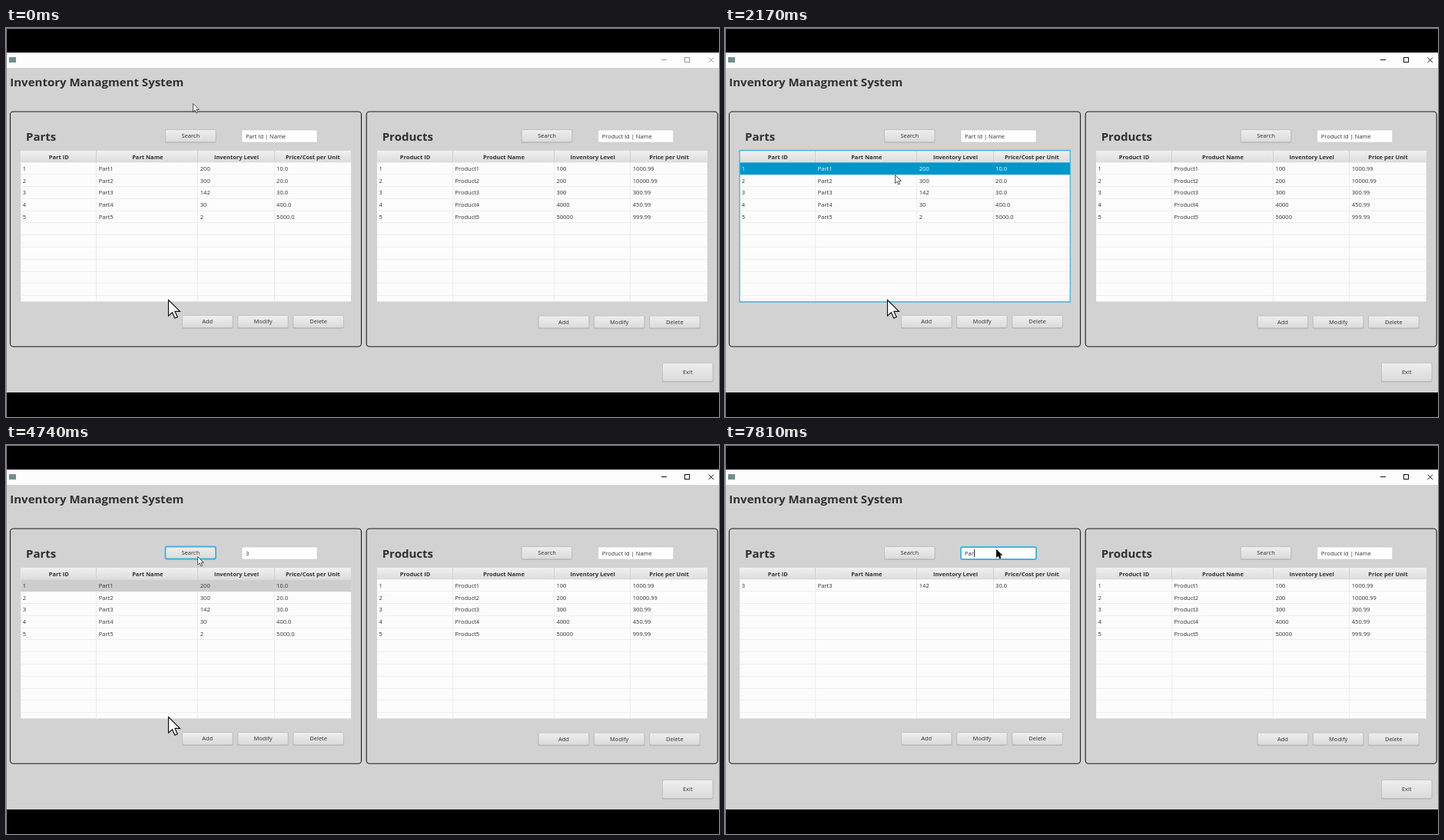
Recreate the animation shown at these times as an HTML page with a canvas. Size 928 by 507 pixels, loop 8 s.

```html
<!DOCTYPE html>
<html lang="en">
<head>
<meta charset="utf-8">
<title>Inventory</title>
<style>
  html, body { margin: 0; width: 100%; height: 100%; overflow: hidden; background: #000; }
  canvas { display: block; width: 928px; height: 507px; }
</style>
</head>
<body>
<canvas id="stage" width="928" height="507"></canvas>
<script>
const ctx = document.getElementById('stage').getContext('2d');
const FONT = '"Open Sans", "Noto Sans", sans-serif';
const INK = '#303030', BLUE = '#0096c9', RING = '#48b2d8';
const LOOP = 8000, STEP = 182, LAST = 43;
const ROW = 15.8, ROW_TOP = 175.3;

const parts = {
  title: 'Parts', prompt: 'Part Id | Name', dx: 0, dy: 0,
  heads: ['Part ID', 'Part Name', 'Inventory Level', 'Price/Cost per Unit'],
  rows: [['1', 'Part1', '200', '10.0'], ['2', 'Part2', '300', '20.0'], ['3', 'Part3', '142', '30.0'],
         ['4', 'Part4', '30', '400.0'], ['5', 'Part5', '2', '5000.0']]
};
const products = {
  title: 'Products', prompt: 'Product Id | Name', dx: 463.7, dy: 0.5,
  heads: ['Product ID', 'Product Name', 'Inventory Level', 'Price per Unit'],
  rows: [['1', 'Product1', '100', '1000.99'], ['2', 'Product2', '200', '10000.99'], ['3', 'Product3', '300', '300.99'],
         ['4', 'Product4', '4000', '450.99'], ['5', 'Product5', '50000', '999.99']]
};

// Pointer paths as [step, x, y]
const pointerPath = [
  [0, 243, 98], [3, 115, 182], [5, 80, 188], [6, 80, 191], [8, 40, 192], [9, 24, 212], [10, 66, 230],
  [12, 221, 191], [13, 224, 190], [18, 346, 140], [20, 362, 146], [22, 350, 141], [24, 262, 144],
  [26, 249, 145], [28, 249, 145], [31, 282, 145], [34, 353, 136]
];
const bigPath = [[0, 211, 354], [28, 211, 354], [31, 294, 350], [34, 361, 192]];

function along(path, k) {
  const i = path.findIndex(p => p[0] > k);
  if (i < 0) return path[path.length - 1].slice(1);
  const [a, x0, y0] = path[i - 1], [b, x1, y1] = path[i];
  const u = (k - a) / (b - a);
  return [Math.round(x0 + (x1 - x0) * u), Math.round(y0 + (y1 - y0) * u)];
}

function rect(x, y, w, h, fill) {
  ctx.fillStyle = fill;
  ctx.fillRect(x, y, w, h);
}

function box(x, y, w, h, r, fill, stroke, line = 1) {
  ctx.beginPath();
  ctx.roundRect(x, y, w, h, r);
  if (fill) { ctx.fillStyle = fill; ctx.fill(); }
  if (stroke) { ctx.strokeStyle = stroke; ctx.lineWidth = line; ctx.stroke(); }
}

function text(str, x, y, { size = 7.5, bold = false, align = 'left', color = INK } = {}) {
  ctx.font = `${bold ? 700 : 400} ${size}px ${FONT}`;
  ctx.textAlign = align;
  ctx.fillStyle = color;
  ctx.fillText(str, x, y + size * 0.36);
}

function shade(y, h, top, bottom) {
  const g = ctx.createLinearGradient(0, y, 0, y + h);
  g.addColorStop(0, top);
  g.addColorStop(1, bottom);
  return g;
}

function button(label, x, y, w, h, focused) {
  box(x, y + 0.8, w, h, 2, '#b4b4b4');
  box(x + 0.5, y + 0.5, w - 1, h - 1, 2, shade(y, h, '#efefef', '#dadada'), '#c2c2c2');
  if (focused) box(x + 0.5, y + 0.5, w - 1, h - 1, 2, null, RING, 1.8);
  text(label, x + w / 2, y + h / 2, { align: 'center' });
}

function field(x, y, value, focused) {
  box(x, y, 98, 16, 1.5, '#fff', '#c8c8c8', 0.6);
  if (focused) box(x, y, 98, 16, 2, null, RING, 1.8);
  text(value, x + 5, y + 8);
  if (focused) rect(Math.round(x + 5 + ctx.measureText(value).width), y + 3, 1, 10, '#333');
}

function table(data, rows, selected, focused) {
  const x = 19.3 + data.dx, edges = [0, 99, 231, 330.3, 429.7];
  rect(x, 160, 429.7, 196.5, '#fcfcfc');
  rect(x, 160, 429.7, 15.3, shade(160, 15.3, '#f0f0f0', '#dcdcdc'));
  for (let i = 1; i < 12; i++) rect(x, Math.round(ROW_TOP + i * ROW) - 1, 429.7, 1, '#eeeeee');
  if (selected) rect(x, 175.3, 429.7, 15.9, focused ? BLUE : '#cdcdcd');
  for (let i = 1; i < 4; i++) {
    const cx = Math.round(x + edges[i]) - 1;
    rect(cx, 160, 1, 15, '#cfcfcf');
    rect(cx, selected ? 191 : 175, 1, selected ? 165 : 181, '#ededed');
  }
  data.heads.forEach((head, i) =>
    text(head, x + (edges[i] + edges[i + 1]) / 2, 167.8, { bold: true, align: 'center' }));
  rows.forEach((row, r) => row.forEach((cell, c) =>
    text(cell, x + edges[c] + 2.5, 183 + r * ROW, { color: selected && focused && !r ? '#fff' : INK })));
  if (focused) box(x - 0.3, 159.5, 430.3, 197.5, 0, null, RING, 1.3);
}

function panel(data, s) {
  const { dx, dy } = data;
  box(5.5 + dx, 109, 457, 306.3, 4, null, '#1c1c1c', 1.1);
  text(data.title, 26 + dx, 141.3, { size: 15, bold: true });
  button('Search', 207 + dx, 132, 66.5, 17, s.searchFocus);
  field(307 + dx, 133, s.value ?? data.prompt, s.fieldFocus);
  table(data, s.rows || data.rows, s.selected, s.tableFocus);
  ['Add', 'Modify', 'Delete'].forEach((label, i) =>
    button(label, 229 + dx + i * 72.2, 374 + dy, 66.5, 17));
}

function pointer(x, y, size, fill, edge, line) {
  const pts = [[0, 0], [0, 17], [4, 13.3], [6.8, 19.5], [9.6, 18.2], [6.9, 12.2], [12.2, 12.2]];
  ctx.beginPath();
  pts.forEach(([px, py]) => ctx.lineTo(x + 0.5 + px * size, y + 0.5 + py * size));
  ctx.closePath();
  ctx.fillStyle = fill;
  ctx.fill();
  ctx.strokeStyle = edge;
  ctx.lineWidth = line;
  ctx.lineJoin = 'miter';
  ctx.stroke();
}

function windowFrame(active) {
  rect(0, 0, 928, 507, '#000');
  rect(0, 0, 928, 1, '#8c8c8c');
  rect(0, 0, 1, 507, '#8c8c8c');
  rect(1, 32, 927, 20, '#fdfdfd');
  rect(1, 52, 927, 423, '#d2d2d2');
  rect(4, 38, 9, 7, '#6f8f8a');
  const tone = active ? '#111' : '#999';
  rect(853, 41, 7, 1, tone);
  ctx.strokeStyle = tone;
  ctx.lineWidth = 1;
  ctx.strokeRect(883.5, 38.5, 6, 6);
  ctx.beginPath();
  ctx.moveTo(914.5, 38.5); ctx.lineTo(921, 45);
  ctx.moveTo(921, 38.5); ctx.lineTo(914.5, 45);
  ctx.stroke();
  text('Inventory Managment System', 5.3, 70.8, { size: 15, bold: true });
}

function fieldValue(k) {
  if (k < 22) return undefined;
  if (k < 23) return '';
  if (k < 37) return '3';
  if (k < 41) return '';
  return k < LAST ? 'Pa' : 'Par';
}

function draw(k) {
  const filtered = k >= 27;
  windowFrame(k >= 4);
  panel(parts, {
    value: fieldValue(k),
    rows: filtered ? [parts.rows[2]] : parts.rows,
    selected: k >= 4 && !filtered,
    tableFocus: k >= 4 && k < 22,
    fieldFocus: (k >= 22 && k < 25) || k >= 37,
    searchFocus: k >= 25 && k < 37
  });
  panel(products, {});
  button('Exit', 854, 436, 66.5, 25);

  if (k < 35) pointer(...along(bigPath, k), 1.22, '#fff', '#111', 1.2);
  const [x, y] = along(pointerPath, k);
  const overField = x > 306 && x < 405 && y > 132 && y < 150;
  if (overField) pointer(x, y, 0.58, '#000', '#000', 0.8);
  else pointer(x, y, 0.64, '#fff', '#444', 0.9);
}

const start = performance.now();
function tick() {
  const t = (performance.now() - start) % LOOP;
  draw(Math.min(LAST, Math.floor((t + 32) / STEP)));
  requestAnimationFrame(tick);
}
tick();
</script>
</body>
</html>
```
